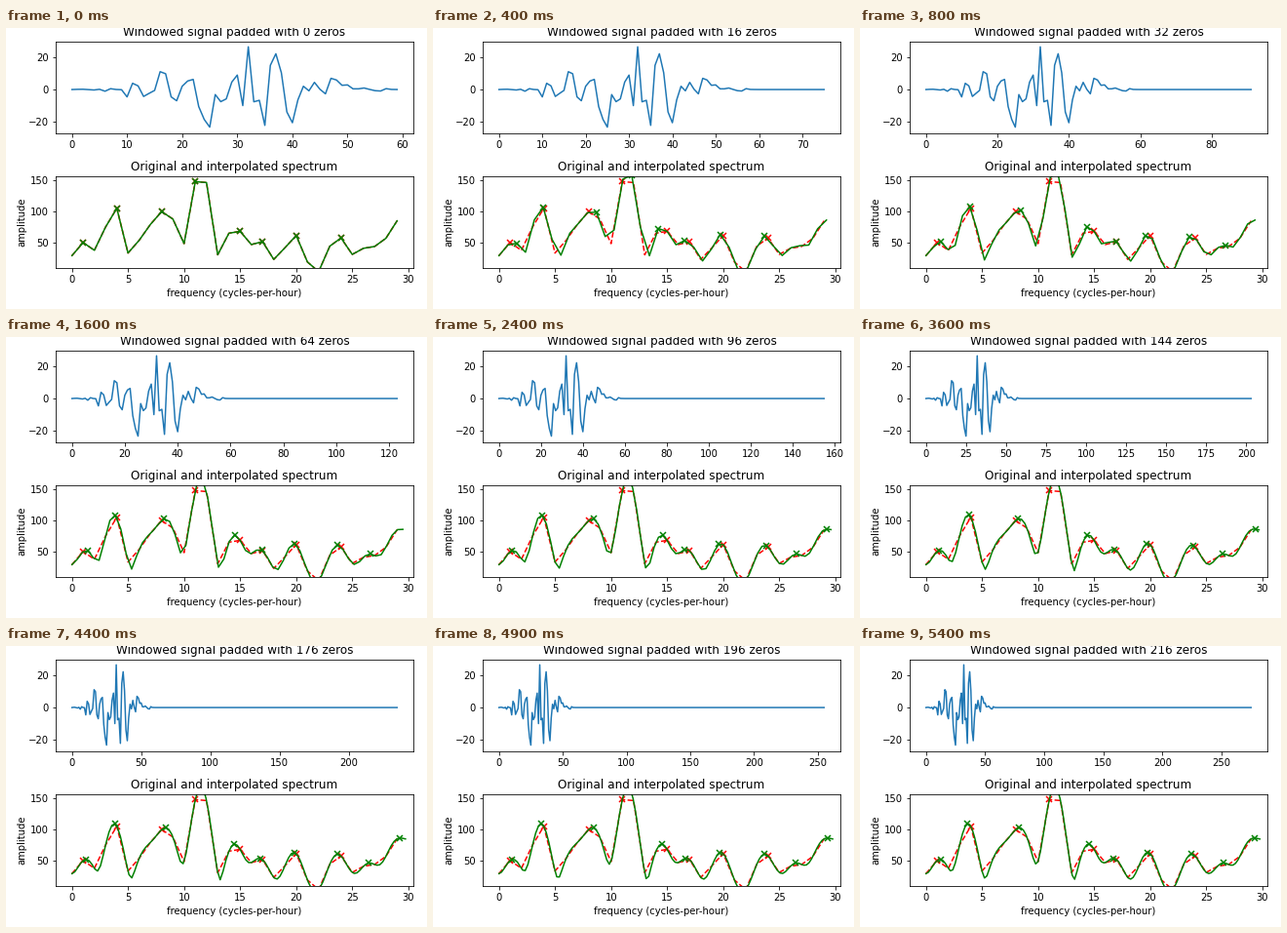
These frames come from a looping animation (432 px wide and 288 px high, 5.5 s). A matplotlib script:

```python
import matplotlib.pyplot as plt
import numpy as np
from matplotlib.animation import FuncAnimation

W, H, DPI = 432, 288, 72
FRAMES, INTERVAL = 55, 100
PAD_STEP = 4
MINUTES = 60

# cycles per hour, spectral height, phase in degrees at mid-window
TONES = [
    (1.25, 53, -150), (3.75, 109, -62), (6.6, 70, 48), (8.5, 102, 21),
    (10, 40, -77), (11.56, 166, -139), (14.55, 77, 104), (16.8, 55, 48),
    (19.75, 63, 95), (23.7, 61, 111), (26, 29, 83), (27, 32, 39), (29, 85, 8)]


def windowed_signal():
    """Sum of tones under a Hann window, scaled to the given heights."""
    turn = 2 * np.pi * (np.arange(MINUTES) - MINUTES / 2) / MINUTES
    window = 0.5 + 0.5 * np.cos(turn)
    tones = sum(height * np.cos(freq * turn + np.radians(phase))
                for freq, height, phase in TONES)
    return window * tones * 2 / window.sum()


def spectrum(x):
    n = len(x)
    half = n // 2
    return np.arange(half) * MINUTES / n, np.abs(np.fft.fft(x))[:half]


def peaks(freq, amp):
    mid = amp[1:-1]
    top = np.flatnonzero((mid > amp[:-2]) & (mid > amp[2:])) + 1
    return freq[top], amp[top]


def add_axes(top):
    return fig.add_axes([51 / W, 1 - (top + 94) / H, 367 / W, 94 / H])


signal = windowed_signal()

fig = plt.figure(figsize=(W / DPI, H / DPI), dpi=DPI, facecolor="white")
ax_time = add_axes(14)
ax_freq = add_axes(152)

wave, = ax_time.plot([], [], color="C0")
ax_time.set_ylim(-27.2, 29.7)

base = spectrum(signal)
cross = dict(marker="x", ls="none", ms=6, mew=1.5)
ax_freq.plot(*base, "r--")
ax_freq.plot(*peaks(*base), color="r", **cross)
curve, = ax_freq.plot([], [], "g-")
marks, = ax_freq.plot([], [], color="g", **cross)
ax_freq.set_xlim(-1.45, 30.45)
ax_freq.set_ylim(9.3, 156.2)
ax_freq.set_title("Original and interpolated spectrum")
ax_freq.set_xlabel("frequency (cycles-per-hour)")
ax_freq.set_ylabel("amplitude")


def update(i):
    zeros = PAD_STEP * i
    padded = np.pad(signal, (0, zeros))
    last = len(padded) - 1
    wave.set_data(np.arange(last + 1), padded)
    ax_time.set_xlim(-0.05 * last, 1.05 * last)
    ax_time.set_title(f"Windowed signal padded with {zeros} zeros")
    freq, amp = spectrum(padded)
    curve.set_data(freq, amp)
    marks.set_data(*peaks(freq, amp))
    return wave, curve, marks


anim = FuncAnimation(fig, update, frames=FRAMES, interval=INTERVAL,
                     init_func=lambda: update(0), repeat=True, repeat_delay=0)
plt.show()
```
